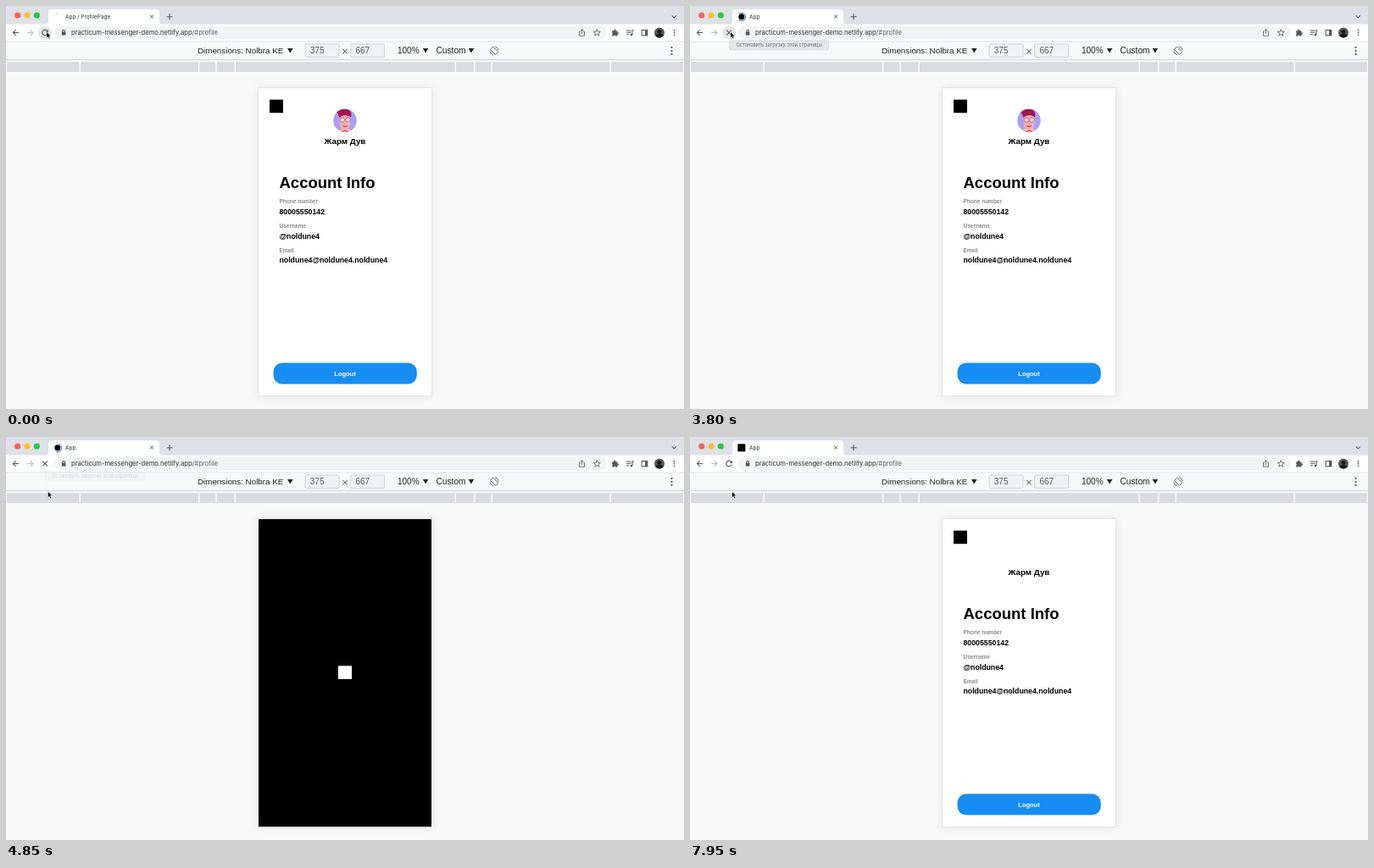
Animation of 800 by 476 pixels, one loop 8000 ms. Source, as an HTML page:

```html
<!DOCTYPE html>
<html lang="en">
<head>
<meta charset="utf-8">
<title>Profile page reload</title>
<style>
  html, body { margin: 0; width: 100%; height: 100%; overflow: hidden; background: #f8f8f8; }
  svg { display: block; width: 100vw; height: 100vh; }
  text { white-space: pre; }
  .ui { font-family: Inter, Roboto, sans-serif; fill: #303236; }
  .dev { font: 10px "Liberation Sans", Arial, sans-serif; fill: #222; }
  .page { font-family: "Liberation Sans", Arial, sans-serif; font-weight: 700; fill: #000; }
  .label { font-size: 6.5px; fill: #8b8b8b; }
  .value { font-size: 8.75px; }
  .line { fill: none; stroke: #54575b; stroke-width: 1.1; }
</style>
</head>
<body>
<svg viewBox="0 0 800 476" preserveAspectRatio="none">
  <defs>
    <filter id="shadow" x="-20%" y="-20%" width="140%" height="140%">
      <feDropShadow dx="0" dy="0" stdDeviation="5" flood-color="#000" flood-opacity=".1"/>
    </filter>
    <clipPath id="face"><circle cx="400" cy="135.2" r="13.7"/></clipPath>
    <clipPath id="user"><circle cx="771" cy="31.5" r="6"/></clipPath>
  </defs>

  <!-- tab strip -->
  <rect width="800" height="22" fill="#dee1e6"/>
  <circle cx="13.7" cy="11" r="3.6" fill="#fe5f57"/>
  <circle cx="25" cy="11" r="3.6" fill="#febc2e"/>
  <circle cx="36.3" cy="11" r="3.6" fill="#28c840"/>
  <path d="M46 22Q50 22 50 18V8Q50 4 54 4H177Q181 4 181 8V18Q181 22 185 22Z" fill="#fff"/>
  <g class="line">
    <path d="M170 10.5l4 4m0-4l-4 4" stroke-width="1"/>
    <path d="M189.5 12.7h7m-3.5-3.5v7"/>
    <path d="M785.8 11.3l2.5 2.5 2.5-2.5"/>
  </g>
  <text id="title" class="ui" x="70" y="15" font-size="6.45"></text>
  <path id="wait" fill="none" stroke="#a4a8ad" stroke-width=".8"/>
  <path id="spin" fill="none" stroke="#3367b8" stroke-width="1"/>
  <rect id="icon" fill="#000"/>

  <!-- address bar -->
  <rect y="21.5" width="800" height="20.5" fill="#fff"/>
  <rect x="57" y="24" width="652" height="15" rx="7.5" fill="#f1f3f4"/>
  <g class="line">
    <path d="M15.2 31.5H8.4m3.2-3.2l-3.2 3.2 3.2 3.2"/>
    <path d="M25.2 31.5H32m-3.2-3.2l3.2 3.2-3.2 3.2" stroke="#babcbe"/>
  </g>
  <circle id="hover" cx="46" cy="31.5" r="8" fill="#e6e7e9"/>
  <g id="reload">
    <path class="line" d="M48.8 29.6A3.3 3.3 0 1 0 49.2 32.4"/>
    <path d="M49.8 27.7v3.2h-3.2z" fill="#54575b"/>
  </g>
  <path id="stop" class="line" d="M43.1 28.6l5.8 5.8m0-5.8l-5.8 5.8"/>
  <rect x="65.8" y="30.6" width="4.6" height="3.8" rx=".5" fill="#54575b"/>
  <path class="line" d="M66.8 31v-1.4a1.3 1.3 0 0 1 2.6 0V31" stroke-width=".8"/>
  <text class="ui" x="77" y="34.3" font-size="7.6">practicum-messenger-demo.netlify.app<tspan fill="#5f6368">/#profile</tspan></text>
  <g class="line" stroke-width=".9">
    <path d="M678 30.2h-1.5v5h6v-5H681M679.5 33v-5.5m-1.8 1.6l1.8-1.8 1.8 1.8" stroke-width=".8"/>
    <path id="star" stroke-width=".8"/>
    <path d="M732 29h5.5m-5.5 2.3h5.5M732 33.7h3.2M739 34v-5.2h1.8" />
    <rect x="750.2" y="28.4" width="6.6" height="6.4"/>
  </g>
  <circle cx="737.9" cy="34" r="1.3" fill="#54575b"/>
  <rect x="754" y="28.4" width="2.8" height="6.4" fill="#54575b"/>
  <path d="M715.2 29.3h2v-.6a1.1 1.1 0 0 1 2.2 0v.6h2v2h.5a1.1 1.1 0 0 1 0 2.2h-.5v2h-2.2a1 1 0 0 0-2 0h-2v-2.1a1.1 1.1 0 0 0 0-2z" fill="#54575b"/>
  <g clip-path="url(#user)">
    <rect x="765" y="25" width="12" height="13" fill="#55575a"/>
    <circle cx="771" cy="30.2" r="2.5" fill="#191a1c"/>
    <path d="M765 38q0-5 6-5t6 5z" fill="#191a1c"/>
  </g>
  <g id="menus" fill="#54575b"></g>

  <!-- device toolbar -->
  <rect y="42" width="800" height="21.5" fill="#f8f9f9"/>
  <path d="M0 42h800" stroke="#dcdee1" stroke-width=".8"/>
  <path d="M0 63.7h800" stroke="#c8cacd" stroke-width="1"/>
  <g class="dev">
    <text x="226" y="56.2" style="font-size:9.8px">Dimensions: Nolbra KE</text>
    <text x="358.8" y="56.2"></text>
    <text x="462" y="56.2">100%</text>
    <text x="507.5" y="56.2" style="font-size:10.2px">Custom</text>
    <path d="M332 50h6.6l-3.3 5.4zM491.8 50h6.6l-3.3 5.4zM545.6 50h6.6l-3.3 5.4z"/>
    <g fill="#f1f2f3" stroke="#cccfd2" stroke-width=".9">
      <rect x="353" y="45" width="40" height="15.5" rx="1.5"/>
      <rect x="406.7" y="45" width="40" height="15.5" rx="1.5"/>
    </g>
    <text x="358.8" y="56.4" fill="#55585c">375</text>
    <text x="412.4" y="56.4" fill="#55585c">667</text>
    <path d="M397.2 50.9l5.6 5.6m0-5.6l-5.6 5.6" stroke="#333" stroke-width=".9"/>
  </g>
  <g class="line" stroke-width=".9">
    <rect x="573.7" y="48.4" width="4.8" height="8.6" rx=".8" transform="rotate(-45 576.1 52.7)" stroke-width=".9"/>
    <path d="M577 47.8a5 5 0 0 1 4.2 4.6M575.2 57.7a5 5 0 0 1-4.2-4.6" stroke-width=".8"/>
  </g>
  <rect y="64.2" width="800" height="15" fill="#fbfbfb"/>
  <g id="ruler" fill="#dadce0"></g>

  <!-- tooltip -->
  <g id="tip">
    <rect x="46.5" y="40.2" width="117" height="11.8" rx="1.5" fill="#e4e4e5" stroke="#d2d2d4" stroke-width=".5"/>
    <text class="ui" x="105" y="48.2" font-size="5.7" text-anchor="middle" style="fill:#606165">Остановить загрузку этой страницы</text>
  </g>

  <!-- phone -->
  <rect x="298" y="97" width="204" height="363.3" fill="#fff" filter="url(#shadow)"/>
  <g id="profile" class="page">
    <rect x="297.7" y="96.7" width="204.6" height="363.6" fill="#fefefe" stroke="#dedede" stroke-width=".6"/>
    <rect x="311" y="110.6" width="16" height="15.6"/>
    <g id="avatar" clip-path="url(#face)">
      <rect x="386" y="121" width="28" height="28" fill="#aa9ef8"/>
      <path d="M391.5 150q1-5 5.5-5.5h6q4.500 .5 5.500 5.500z" fill="#f4b5b4"/>
      <path d="M393.500 130q6.500-4 13 0v8q-1 8-6.500 8.500t-6.500-8.500z" fill="#f6aeb2"/>
      <path d="M390 125q6-5 14-2.500 4.500 2 3 9-2-2-6-2.500-5 0-7.500 3-1-4-3.500-7z" fill="#a3164f"/>
      <g fill="#fbe3e2" stroke="#a84a68" stroke-width=".8">
        <circle cx="396.900" cy="134.500" r="2.600"/>
        <circle cx="403.500" cy="134.500" r="2.600"/>
      </g>
      <path d="M397.500 141.500q2.700 1.800 5.200 0" fill="none" stroke="#c53c50" stroke-width="1.200"/>
      <path d="M396 149l4-2 4 2" fill="none" stroke="#d9414c" stroke-width="1.200"/>
    </g>
    <text x="400" y="163.300" font-size="9.800" text-anchor="middle">Жарм Дув</text>
    <text x="322.500" y="215" font-size="18.500">Account Info</text>
    <text class="label" x="322.500" y="233.200">Phone number</text>
    <text class="value" x="322.500" y="246">80005550142</text>
    <text class="label" x="322.500" y="262">Username</text>
    <text class="value" x="322.500" y="274.500">@noldune4</text>
    <text class="label" x="322.500" y="290.500">Email</text>
    <text class="value" x="322.500" y="303">noldune4@noldune4.noldune4</text>
    <rect x="315.500" y="421.500" width="169.300" height="25" rx="10.500" fill="#168df2"/>
    <text x="400" y="436.700" font-size="7.500" text-anchor="middle" fill="#fff">Logout</text>
  </g>
  <g id="loader">
    <rect x="298" y="97" width="204" height="363.300"/>
    <rect x="392" y="270.300" width="16" height="15.600" fill="#fff"/>
  </g>

  <path id="cursor" d="M0 0V7.200L1.600 5.700 2.700 8.300 4 7.700 2.900 5.200H5z" fill="#000" stroke="#fff" stroke-width=".5"/>
</svg>
<script>
  const LOOP = 8000, STEP = 50;
  const STOP_AT = 50, RESPONSE = 2434, TIP_ON = 3500, LEAVE = 4200, ARRIVE = 4450,
        FADE = 4500, BLACK = 4700, LOADED = 5050, READY = 7900;
  const $ = id => document.getElementById(id);
  const set = (id, attrs) => { for (const k in attrs) $(id).setAttribute(k, attrs[k]); };
  const show = (id, on) => set(id, { visibility: on ? 'visible' : 'hidden' });
  const clamp = x => Math.max(0, Math.min(1, x));
  const ease = x => x * x * (3 - 2 * x);

  const ruler = [1, 88, 228.300, 248.700, 271, 531, 553.500, 574, 714, 800.500];
  $('ruler').innerHTML = ruler.slice(1).map((end, i) =>
    `<rect x="${ruler[i]}" y="66" width="${end - ruler[i] - 1.500}" height="12"/>`).join('');

  const dots = (x, y, gap, r) => [-1, 0, 1].map(i =>
    `<circle cx="${x}" cy="${y + i * gap}" r="${r}"/>`).join('');
  $('menus').innerHTML = dots(788.500, 31.500, 2.800, .9);
  $('ruler').insertAdjacentHTML('beforebegin',
    `<g fill="#54575b">${dots(785.500, 52.900, 4, 1.100)}</g>`);

  const star = [...Array(10).keys()].map(i => {
    const a = (i * 36 - 90) * Math.PI / 180, r = i % 2 ? 1.800 : 4.200;
    return `${697.300 + r * Math.cos(a)} ${31.700 + r * Math.sin(a)}`;
  });
  set('star', { d: `M${star.join('L')}Z` });

  // Arc around the tab icon, angles in degrees
  function arc(r, start, sweep) {
    const at = deg => {
      const a = deg * Math.PI / 180;
      return `${60.800 + r * Math.cos(a)} ${12.900 + r * Math.sin(a)}`;
    };
    return `M${at(start)}A${r} ${r} 0 ${Math.abs(sweep) > 180 ? 1 : 0} ${sweep > 0 ? 1 : 0} ${at(start + sweep)}`;
  }

  function loadingArc(t) {
    const n = Math.floor(t / 666);
    let sweep = 270 * ease(t / 666 - n);
    if (n % 2 === 0) sweep -= 270;
    if (Math.abs(sweep) < 5) sweep = 5;
    return arc(4.800, 270 + 360 * t / 1568 + 270 * Math.ceil(n / 2), sweep);
  }

  function draw(t) {
    const waiting = t < RESPONSE, loading = !waiting && t < LOADED;
    const stopping = t >= STOP_AT && t < LOADED;
    const black = t >= BLACK && t < READY;

    $('title').textContent = waiting ? 'App / ProfilePage' : 'App';
    show('wait', waiting);
    show('spin', loading);
    show('icon', !waiting);
    if (waiting) {
      const turn = 360 * (t + 80) / 1320;
      set('wait', { d: arc(4.300, 270 - turn, Math.min(90, turn)) });
    }
    if (loading) set('spin', { d: loadingArc(t - RESPONSE) });
    const half = loading ? 3.500 : 4.500;
    set('icon', { x: 60.800 - half, y: 12.700 - half, width: 2 * half, height: 2 * half, rx: loading ? half : 0 });

    show('stop', stopping);
    show('reload', !stopping);
    show('hover', t < LEAVE + 50);

    const p = ease(clamp((t - LEAVE) / (ARRIVE - LEAVE)));
    set('cursor', { transform: `translate(${47.900 + 1.600 * p} ${30.500 + 33.700 * p})` });
    set('tip', { opacity: t < TIP_ON ? 0 : .9 * (1 - clamp((t - FADE - 50) / 400)) });

    show('profile', !black);
    show('loader', black);
    show('avatar', t < BLACK);
  }

  function tick() {
    draw(Math.floor(performance.now() % LOOP / STEP) * STEP);
    requestAnimationFrame(tick);
  }
  tick();
</script>
</body>
</html>
```
